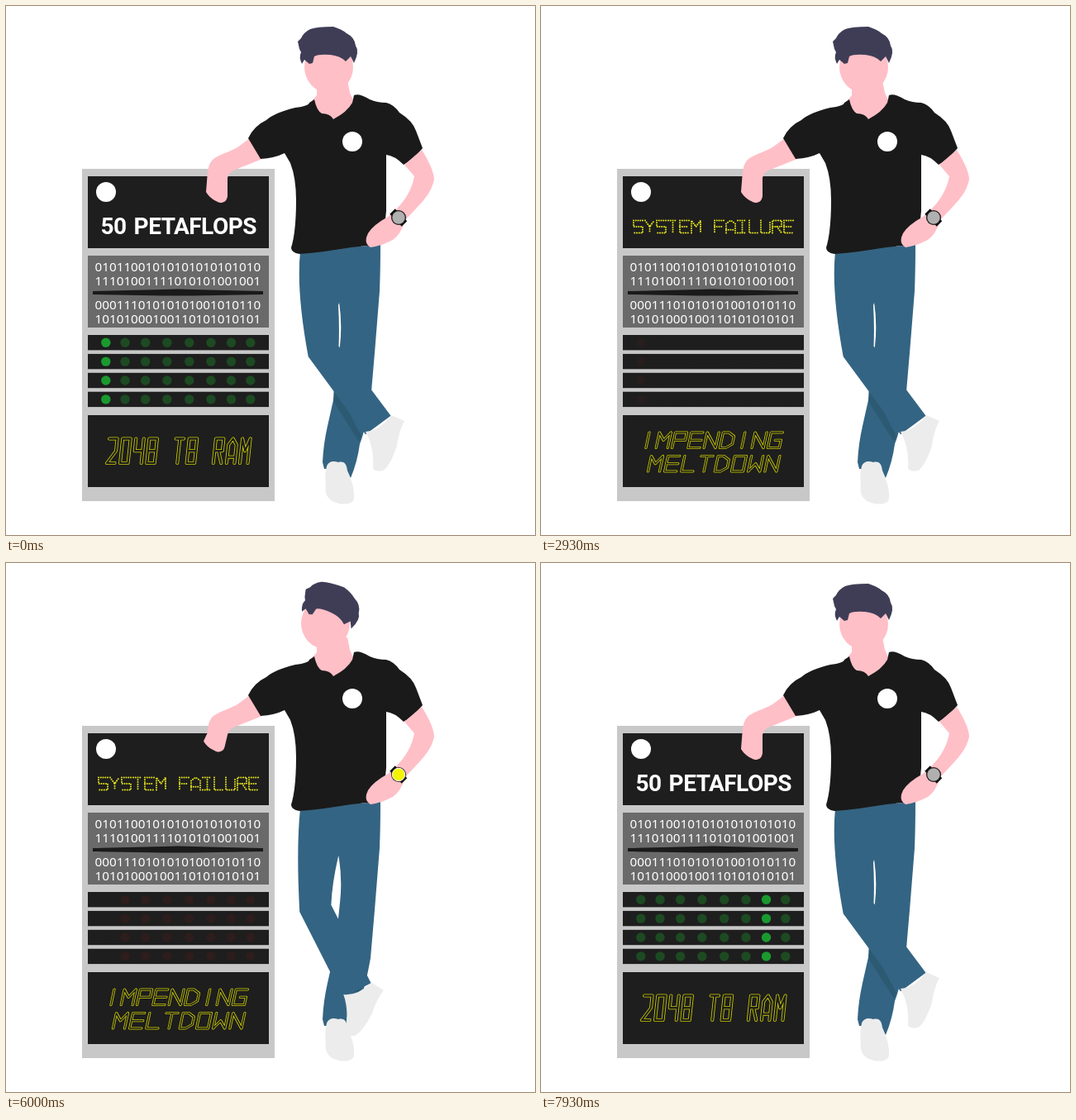
These frames come from a looping animation (640 px wide and 640 px high, 8000 ms). An HTML page:

```html
<!DOCTYPE html>
<html lang="en">
<head>
<meta charset="utf-8">
<title>Server failure</title>
<style>
  html, body { margin: 0; width: 100%; height: 100%; overflow: hidden; background: #fff; }
  svg { display: block; width: 100vw; height: 100vh; }
  .title { font: 700 28px Roboto, sans-serif; letter-spacing: -.5px; word-spacing: 2.5px; fill: #fff; }
  .bits { font: 500 15.25px "Noto Sans", "Open Sans", sans-serif; fill: #fff; }
  .skin { fill: #ffbfc7; }
  .panel { fill: #1e1e1e; }
  .denim { fill: #346483; }
  .shoe { fill: #ececec; }
  .rim, .core, .dots { fill: none; stroke-linejoin: round; stroke-linecap: round; }
  .rim { stroke: #c9c900; }
  .core { stroke: #1e1e1e; }
  .dots { stroke: #e0e01c; stroke-width: 2.1; stroke-dasharray: 0 2.75; }
</style>
</head>
<body>
<svg viewBox="0 0 640 640">
  <rect x="92" y="197" width="233" height="402" fill="#c8c8c8"/>
  <rect class="panel" x="99" y="206" width="219" height="87"/>
  <rect x="99" y="302" width="219" height="87" fill="#6a6a6a"/>
  <path d="M105 345 L190 343 Q208 342 226 343 L311 345 V349 L226 350.5 H190 L105 349Z" fill="#1a1a1a"/>
  <rect class="panel" x="99" y="495" width="219" height="87"/>
  <circle cx="121" cy="225" r="12" fill="#fff"/>
  <g class="bits">
    <text x="107.5" y="320.7">01011001010101010101010</text>
    <text x="107.5" y="337.7">11101001111010101001001</text>
    <text x="107.5" y="367.2">00011101010101001010110</text>
    <text x="107.5" y="384.2">10101000100110101010101</text>
  </g>
  <g id="leds"></g>
  <g id="normal"><text class="title" x="114.5" y="275.5">50 PETAFLOPS</text></g>
  <g id="failure"></g>

  <path class="denim" d="M390 296 L453 288 Q453 320 452 345 L446 420 L441 478 Q435 512 428 530 Q425 552 417 571 L411 561 L385 560 L383 552 Q384 530 389 508 L398 468 L404 411 Q407 385 403 358Z"/>
  <path class="shoe" d="M388 557 C390 551 396 550 402 552 C410 550 412 555 413 562 C418 573 422 585 421 596 C420 603 408 604 400 601 C390 599 385 590 387 580 C386 570 386 565 388 557Z"/>
  <path id="shadow" fill="#2c5a73"/>
  <path id="leg" class="denim"/>
  <path id="shoe" class="shoe" d="M435 515 Q452 514 466 495 L482 502 Q475 515 473 532 Q464 558 456 562 Q448 564 444 560 Q446 535 435 515Z"/>

  <path class="skin" d="M376 90 V108 L371 114 L380 133 L396 139 L422 118 L416 105 L413 90Z"/>
  <ellipse id="face" class="skin" cx="390.5" cy="74" rx="29.5" ry="31"/>
  <path id="hair" fill="#3f3d56" d="M355 52 L353 43 L357 39 Q360 32 368 28 Q376 25 396 25 Q406 28 412 33 Q422 38 423 48 Q428 55 421 69 L417 61 L411 67 Q404 60 392 59 Q378 58 373 61 L371 69 L367 70 L361 65 L358 70 Q354 62 357 56Z"/>
  <path id="hand" class="skin"/>
  <path fill="#1a1a1a" d="M373 113 Q376 127 382 130 Q392 130 396 137 Q413 128 419 117 L421 108 Q427 105 440 113 Q449 117 460 117 Q469 119 476 129 Q492 139 496 151 L504 172 Q492 186 481 192 Q470 181 460 180 L460 248 L456 288 Q420 291 385 297 Q370 299 355 300 Q342 298 346 289 Q351 270 351 235 Q351 208 344 190 L337 178 Q325 184 308 185 L293 160 Q300 145 315 138 Q325 129 350 123 Q366 121 367 117Z"/>
  <circle cx="419" cy="164" r="12" fill="#fff"/>
  <path class="skin" d="M503 174 Q518 198 518 210 Q515 226 498 243 L483 259 Q478 276 468 283 Q452 291 441 292 Q432 287 438 275 Q444 265 462 255 L472 246 Q490 228 494 206 L482 192Z"/>
  <path d="M467.5 248.5 L482 263.5" stroke="#111" stroke-width="9"/>
  <circle cx="475" cy="256" r="9" fill="#1a1a1a"/>
  <circle id="dial" cx="475" cy="256" r="7.7"/>
</svg>
<script>
const LOOP = 8000, FAIL = 2400, RESTORE = 6430, RESUME = 7100;
const $ = id => document.getElementById(id);
const set = (id, name, value) => $(id).setAttribute(name, value);

// Stroke letters on a grid 2 wide and 4 high: each pair is one point.
const GLYPHS = {
  S: '20 00 02 22 24 04', Y: '00 12 20|12 14', T: '00 20|10 14', E: '20 00 04 24|02 22',
  M: '04 00 12 20 24', F: '20 00 04|02 22', A: '04 01 10 21 24|03 23', I: '00 20|10 14|04 24',
  i: '10 14', L: '00 04 24', U: '00 04 24 20', R: '04 00 20 22 02|12 24', P: '04 00 20 22 02',
  N: '04 00 24 20', D: '00 10 21 23 14 04 00', G: '20 00 04 24 22 12', O: '00 20 24 04 00',
  W: '00 04 12 24 20', B: '00 20 24 04 00|02 22', 2: '00 20 22 04 24', 4: '00 02 22|20 24'
};
GLYPHS[0] = GLYPHS.O;
GLYPHS[8] = GLYPHS.B;

const letters = (text, pitch, w, h) => [...text].map((c, i) =>
  (GLYPHS[c] || '').split('|').filter(Boolean).map(line => 'M' + line.split(' ').map(([x, y]) =>
    `${i * pitch + x * w / 2} ${(y / 4 - 1) * h}`).join('L')).join('')).join('');

function outlined(text, x, y, pitch, w, h, slant, rim) {
  const d = letters(text, pitch, w, h);
  return `<g transform="translate(${x} ${y}) skewX(${-slant})">
    <path class="rim" stroke-width="${rim}" d="${d}"/>
    <path class="core" stroke-width="${rim - 1.7}" d="${d}"/></g>`;
}

$('normal').innerHTML += outlined('2048 TB RAM', 122, 553, 16.1, 9.5, 29.5, 6, 4);
$('failure').innerHTML =
  `<path class="dots" transform="translate(112 274.5)" d="${letters('SYSTEM FAILURE', 14, 11, 15)}"/>` +
  outlined('iMPENDiNG', 120, 534.5, 19.3, 14, 18.5, 12, 3.2) +
  outlined('MELTDOWN', 129.5, 563, 20.2, 14, 18.5, 12, 3.2);

const ROWS = 4, COLUMNS = 8;
let lights = '';
for (let row = 0; row < ROWS; row++) {
  const y = 407 + 22.9 * row;
  lights += `<rect class="panel" x="99" y="${y - 9}" width="219" height="18.4"/>`;
  for (let col = 0; col < COLUMNS; col++) {
    const x = 120.8 + 25 * col - 2.2 * Math.sin(2 * Math.PI * col / 7);
    lights += `<circle cx="${x}" cy="${y + .2}" r="5.7"/>`;
  }
}
$('leds').innerHTML = lights;
const leds = [...$('leds').querySelectorAll('circle')];

const mix = (a, b, k) => a + (b - a) * k;
const ease = (t, from, to) => {
  const k = Math.min(1, Math.max(0, (t - from) / (to - from)));
  return k * k * (3 - 2 * k);
};
// Rises over [a, b], holds, and falls over [c, d].
const hold = (t, a, b, c, d) => ease(t, a, b) - ease(t, c, d);

// Angles are degrees from straight down, positive towards the right.
const radians = degrees => degrees * Math.PI / 180;
const along = ([x, y], angle, length) =>
  [x + Math.sin(radians(angle)) * length, y + Math.cos(radians(angle)) * length];
const across = (point, angle, width) => along(point, angle + 90, width);

const HIP = [380, 300], THIGH = 118, SHIN = 111, SHIN_REST = 36.6;
const joints = (thigh, shin) => {
  const knee = along(HIP, thigh, THIGH);
  return { knee, ankle: along(knee, shin, SHIN) };
};
const REST = joints(2, SHIN_REST);

function drawLeg(kick) {
  const thigh = mix(2, -7.5, kick), shin = mix(SHIN_REST, 17.5, kick), bend = (thigh + shin) / 2;
  const { knee, ankle } = joints(thigh, shin);
  const inner = across(knee, bend, 19.5);
  set('leg', 'd', `M356 297 Q351 345 ${across(knee, bend, -19.5)} L${across(ankle, shin, -19)}
    L${across(ankle, shin, 19)} L${inner} Q${inner[0] + 1} 388 402 ${mix(362, 348, kick)} L430 289Z`);
  set('shoe', 'transform', `translate(${ankle[0] - REST.ankle[0]} ${ankle[1] - REST.ankle[1]})
    rotate(${SHIN_REST - shin} ${REST.ankle})`);
  set('shadow', 'd', `M397 458 L396 478 L427 527 L${mix(430, 437, kick)} ${mix(520, 488, kick)}Z`);
}

function drawHand(k) {
  const p = (x, y) => `${x - 3 * k} ${y - 9.5 * k}`;
  set('hand', 'd', `M295 160 L280 171 C270 177 256 180 249 187 C244 193 244 203 243.5 206
    L${p(242, 225)} C${p(246, 232)} ${p(253, 236)} ${p(259, 238)}
    C${p(264, 238)} ${p(267, 236)} ${p(268, 230)} L268 208 Q269 202 275 199 L310 185Z`);
}

function drawHead(turn) {
  set('face', 'transform', `translate(${-4 * turn} ${-turn})`);
  set('hair', 'transform', `translate(${5 * turn} ${turn}) rotate(${20 * turn} 390 50)`);
}

function ledColor(t, column) {
  if (t < FAIL || t >= RESTORE) {
    const sweep = t < FAIL ? t : t - RESUME;
    return sweep >= 0 && Math.floor(sweep / 125) % COLUMNS === column ? '#1a9a2e' : '#1d4a22';
  }
  const phase = (t - 2935 + (column ? 0 : 22)) / 281;
  const glow = (1 - Math.cos(phase * 2 * Math.PI)) / 2;
  return `rgb(${mix(30, 245, glow)} ${mix(30, 20, glow)} ${mix(30, 22, glow)})`;
}

function draw(t) {
  const failed = t >= FAIL && t < RESTORE;
  $('normal').style.display = failed ? 'none' : '';
  $('failure').style.display = failed ? '' : 'none';
  leds.forEach((led, i) => led.setAttribute('fill', ledColor(t, i % COLUMNS)));

  drawLeg(hold(t, 5650, 6350, 6580, 7150));
  drawHand(hold(t, 3500, 3900, 6400, 6670));
  drawHead(hold(t, 4420, 4720, 7020, 7320));

  const alert = t >= 4430 && t < 7100;
  set('dial', 'fill', alert ? '#f4f400' : '#b0b0b0');
  set('dial', 'stroke', alert ? '#fff' : 'none');
}

function tick() {
  draw(performance.now() % LOOP);
  requestAnimationFrame(tick);
}
tick();
</script>
</body>
</html>
```
